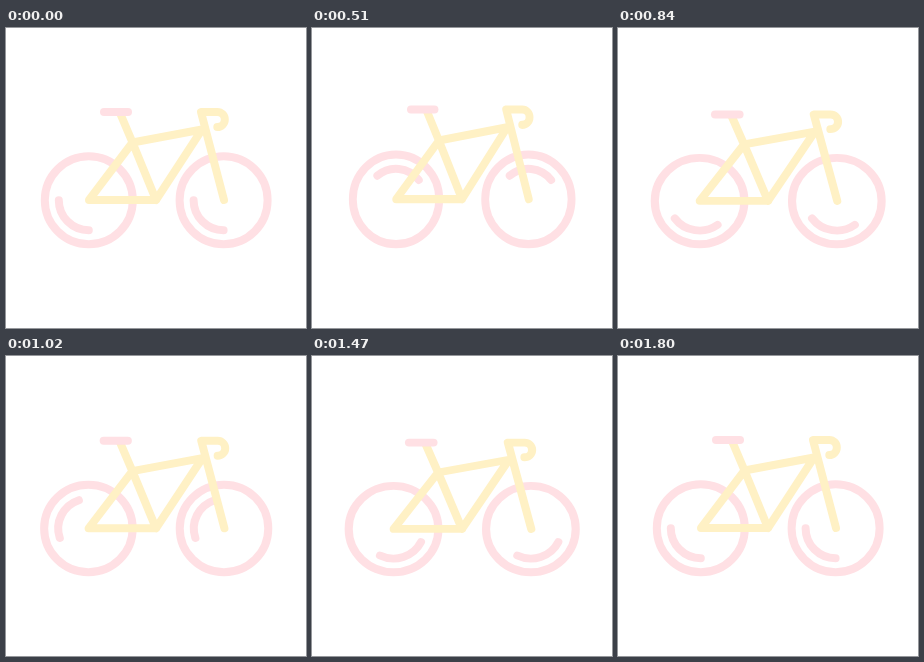
Write an HTML page with a canvas that moves like this. It is 300 by 300 pixels and loops after 1.86 s.

```html
<!DOCTYPE html>
<html lang="en">
<head>
<meta charset="utf-8">
<title>Bicycle</title>
<style>
html, body { margin: 0; width: 100%; height: 100%; overflow: hidden; background: #fff; }
canvas { display: block; width: 300px; height: 300px; }
</style>
</head>
<body>
<canvas id="stage"></canvas>
<script>
const SIZE = 300, LOOP = 1860, MOVE = 1800, STEP = 30;
const PINK = '#ffe0e4', YELLOW = '#fff1c5';
const FLOOR = 220.2, AXLE_Y = 172.2;
const WHEELS = [82.8, 217.6];

// [time, stretch]: positive is tall and narrow, negative is squashed
const BOUNCE = [[0, 0], [450, 1], [900, -1], [1200, 1], [1500, -1], [MOVE, 0]];

const canvas = document.getElementById('stage');
const ctx = canvas.getContext('2d');
const dpr = window.devicePixelRatio || 1;
canvas.width = canvas.height = SIZE * dpr;

const ease = p => p * p * (3 - 2 * p);

function stretchAt(t) {
  for (let i = 1; i < BOUNCE.length; i++) {
    const [t0, a] = BOUNCE[i - 1], [t1, b] = BOUNCE[i];
    if (t <= t1) return a + (b - a) * ease((t - t0) / (t1 - t0));
  }
  return 0;
}

function line(...pts) {
  pts.forEach(([x, y], i) => i ? ctx.lineTo(x, y) : ctx.moveTo(x, y));
}

function wheel(x, turn) {
  ctx.beginPath();
  ctx.arc(x, AXLE_Y, 44, 0, Math.PI * 2);
  ctx.stroke();
  ctx.beginPath();
  ctx.arc(x, AXLE_Y, 30, turn + Math.PI / 2, turn + Math.PI);
  ctx.stroke();
}

function frame() {
  const rear = [83, 172], crank = [150, 172], joint = [126.5, 114.5], head = [196, 101.5];
  ctx.beginPath();
  line([114, 85], joint, crank, rear, joint, head, crank);
  line([218, 172], [195, 84], [211.3, 84]);
  ctx.arc(211.3, 91.5, 7.5, -Math.PI / 2, Math.PI / 2);
  ctx.stroke();
}

function seat() {
  ctx.beginPath();
  line([98, 84], [122, 84]);
  ctx.stroke();
}

function draw(t) {
  const turn = ease(t / MOVE) * Math.PI * 4;
  const s = 0.02 * stretchAt(t);
  ctx.setTransform(dpr, 0, 0, dpr, 0, 0);
  ctx.fillStyle = '#fff';
  ctx.fillRect(0, 0, SIZE, SIZE);
  ctx.translate(150, FLOOR);
  ctx.scale(1 - s, 1 + s);
  ctx.translate(-150, -FLOOR);
  ctx.lineWidth = 8;
  ctx.lineCap = ctx.lineJoin = 'round';
  ctx.strokeStyle = PINK;
  WHEELS.forEach(x => wheel(x, turn));
  ctx.strokeStyle = YELLOW;
  frame();
  ctx.strokeStyle = PINK;
  seat();
}

const start = performance.now();
function tick() {
  const t = (performance.now() - start) % LOOP;
  draw(Math.min(MOVE, Math.floor(t / STEP) * STEP));
  requestAnimationFrame(tick);
}
tick();
</script>
</body>
</html>
```
